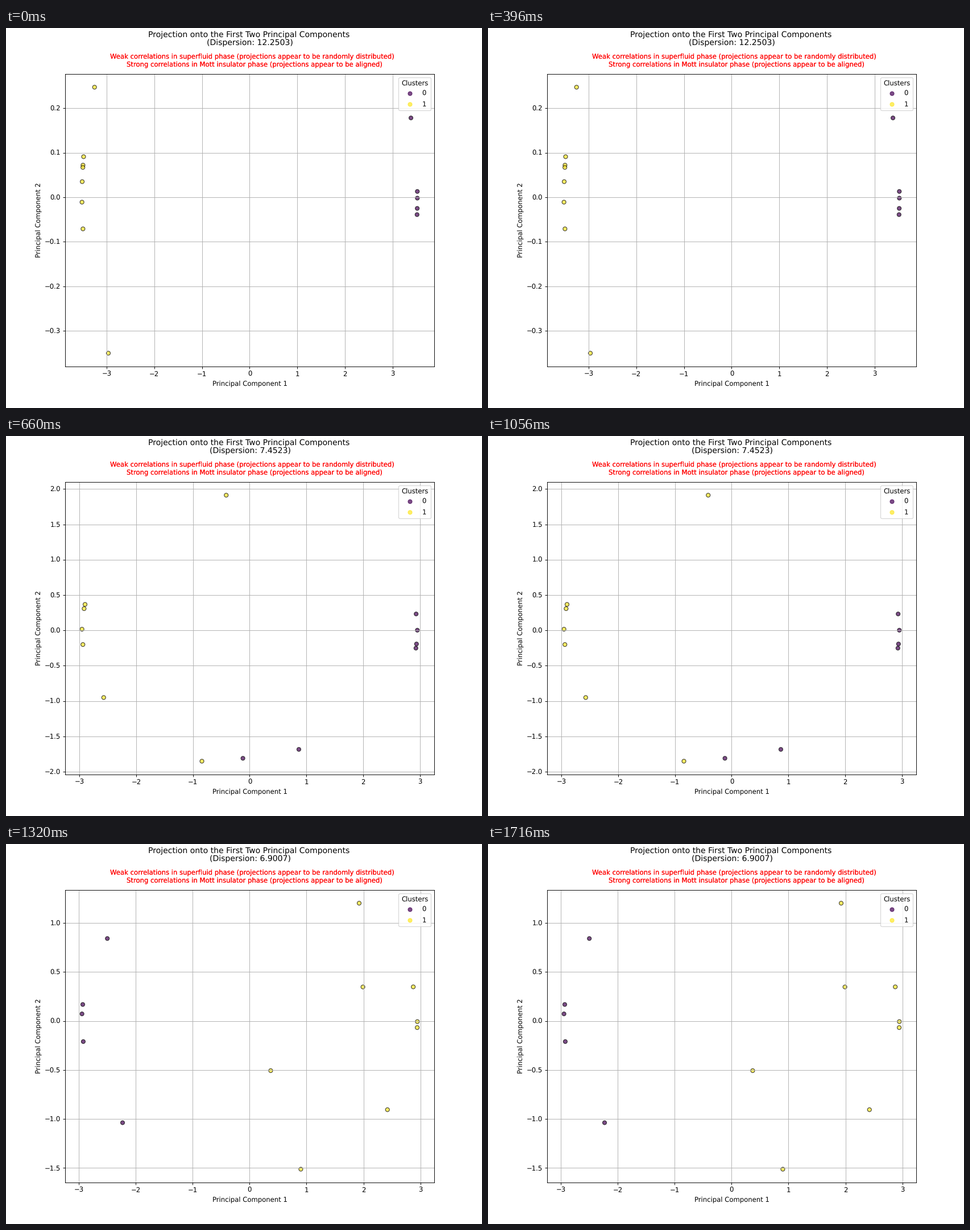
Recreate the animation shown at these times as a matplotlib script. Size 837 by 669 pixels, loop 1980 ms.

```python
import numpy as np
import matplotlib.pyplot as plt
from matplotlib.animation import FuncAnimation

W, H, DPI = 837, 669, 83.7

# Samples hug an ellipse of half-axes a and b, so their heights place them:
# one cluster on its left side, the other on its right. Strays lie off it.
STEPS = [
    dict(dispersion=12.2503, a=3.517, b=.65, left_cluster=1,
         left=[.247, .091, .072, .067, .035, -.011, -.071, -.35],
         right=[.178, .013, -.002, -.025, -.039]),
    dict(dispersion=7.4523, a=2.956, b=1.932, left_cluster=1,
         left=[1.913, .367, .307, .016, -.201, -.951, -1.852],
         right=[.232, .002, -.193, -.252],
         strays=[(-.119, -1.811), (.867, -1.685)], stray_cluster=0),
    dict(dispersion=6.9007, a=2.947, b=1.59, left_cluster=0,
         left=[.843, .169, .073, -.21, -1.039],
         right=[1.204, .349, -.006, -.067, -.906, -1.514],
         strays=[(1.991, .348), (.371, -.507)], stray_cluster=1),
]

plt.rcParams.update({"font.family": "DejaVu Sans", "text.hinting": "none"})
fig, ax = plt.subplots(figsize=(W / DPI, H / DPI), dpi=DPI)

# Half a pixel left and down, so that lines snap to the lower pixel
dx, dy = 0.5 / W, 0.5 / H
fig.subplots_adjust(left=0.125 - dx, right=0.9 - dx,
                    bottom=0.11 - dy, top=0.88 - dy)


def label(x, y, text, size, color="black"):
    """Centred text with its baseline y pixels below the top edge."""
    return fig.text(x / W, 1 - y / H, text, size=size, color=color,
                    ha="center", va="baseline")


label(427, 16, "Projection onto the First Two Principal Components", 12)
dispersion = label(429, 30, "", 12)

# The notes are painted twice, which makes them look heavier
for _ in range(2):
    label(433.3, 54, "Weak correlations in superfluid phase "
          "(projections appear to be randomly distributed)", 10, "red")
    label(437, 67, "Strong correlations in Mott insulator phase "
          "(projections appear to be aligned)", 10, "red")


def samples(step):
    """Positions and cluster numbers of all samples of a step."""
    y = np.array(step["left"] + step["right"])
    on_left = np.arange(len(y)) < len(step["left"])
    x = step["a"] * np.sqrt(1 - (y / step["b"]) ** 2)
    xy = np.column_stack([np.where(on_left, -x, x), y])
    cluster = np.where(on_left, step["left_cluster"], 1 - step["left_cluster"])
    strays = step.get("strays", [])
    if strays:
        xy = np.vstack([xy, strays])
        cluster = np.append(cluster, [step["stray_cluster"]] * len(strays))
    return xy, cluster


def draw(i):
    step = STEPS[i]
    xy, cluster = samples(step)
    ax.clear()
    dots = ax.scatter(*xy.T, c=cluster, cmap="viridis", alpha=0.7,
                      edgecolors="k", linewidths=1)
    ax.legend(*dots.legend_elements(), title="Clusters", loc="upper right")
    ax.set_xlabel("Principal Component 1")
    ax.set_ylabel("Principal Component 2")
    ax.grid(True)
    dispersion.set_text(f"(Dispersion: {step['dispersion']:.4f})")


anim = FuncAnimation(fig, draw, frames=len(STEPS), interval=660,
                     init_func=lambda: None, repeat=True, repeat_delay=0)
plt.show()
```
